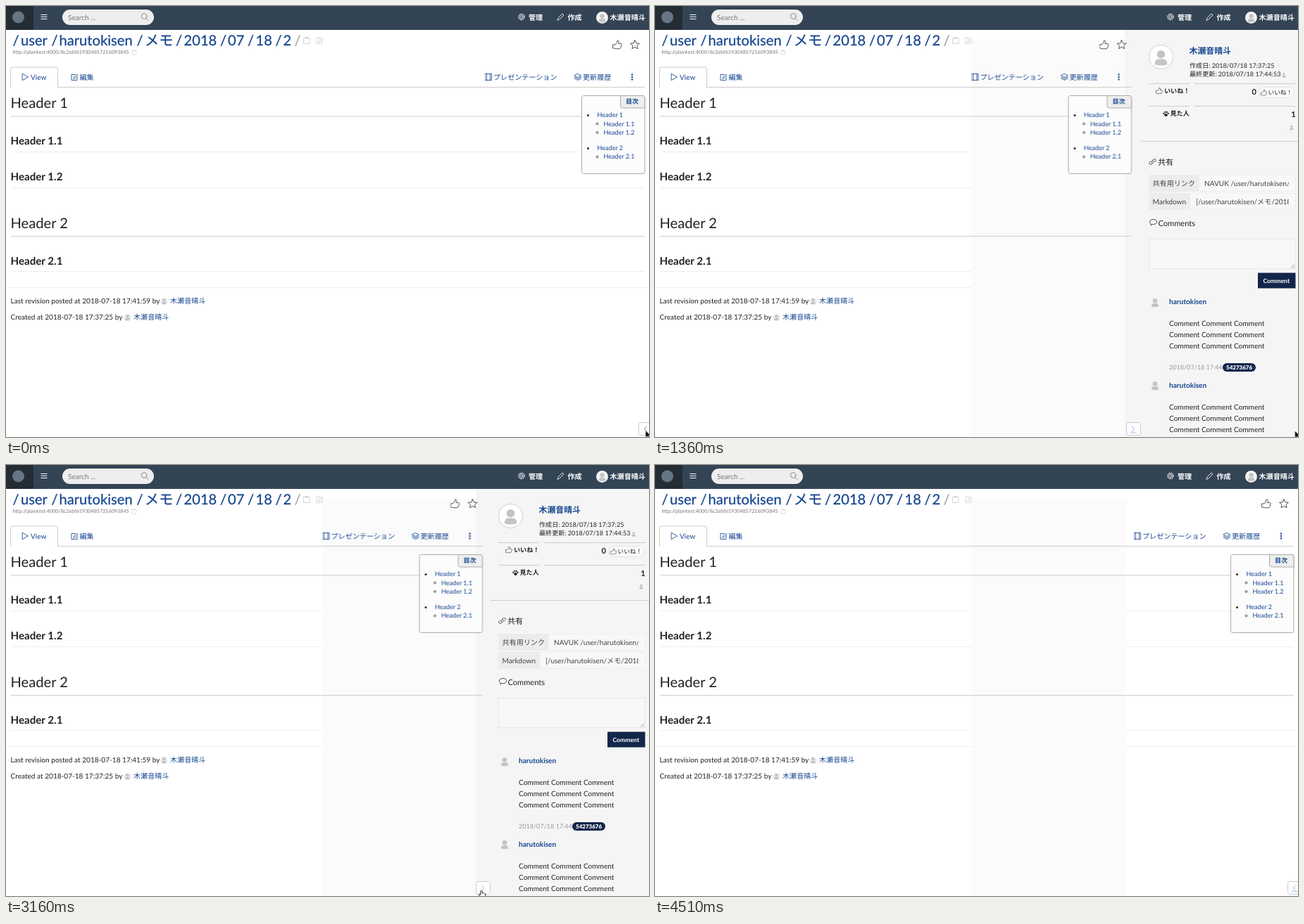
An HTML page that plays this animation: 913 px wide and 613 px high, repeating every 7.1 s.

```html
<!DOCTYPE html>
<html lang="ja">
<head>
<meta charset="utf-8">
<title>Wiki page with side panel</title>
<style>
html, body { margin: 0; width: 100%; height: 100%; overflow: hidden; background: #fff; }
svg { display: block; }
text { font: 10.08px Lato, "Noto Sans CJK JP", sans-serif; fill: #222; white-space: pre; text-rendering: geometricPrecision; }
.b { font-weight: 700; }
.link { fill: #15468f; }
.w { fill: #fff; }
.h1 { font-size: 20.16px; }
.h2 { font-size: 15.12px; font-weight: 700; }
.path { stroke: #15468f; stroke-width: .25; }
.sm { font-size: 9.07px; }
.xs { font-size: 8.64px; }
.md { font-size: 11.1px; }
.grey { fill: #999; }
.soft { fill: #444; }
.ico { fill: none; stroke: #333; stroke-width: .85; stroke-linejoin: round; stroke-linecap: round; }
.ico.nav { stroke: #fff; }
.ico.blue { stroke: #15468f; }
.ico.pale { stroke: #ccc; }
.face { fill: #c4c4c4; }

/* every state is held, so all tracks jump */
.anim { animation: 7100ms step-end infinite; }
.shift { animation-name: shift; }
.rule { animation-name: rule; transform-origin: 7px 0; }
.tint { animation-name: tint; transform-origin: 449px 0; }
.panel { animation-name: panel; }
.panel-bg { animation-name: panel-bg; }
.gap { animation-name: gap; }
.chevron { animation-name: chevron; }
.underline { animation-name: underline; }
.arrow { animation-name: arrow; }
.hand { animation-name: hand; }
.beam { animation-name: beam; }

@keyframes shift {
  0% { transform: none; }
  17.183% { transform: translateX(-230.5px); }
  57.183%, 100% { transform: none; }
}
@keyframes rule {
  0% { transform: none; }
  17.183% { transform: scaleX(.7444); }
  57.183%, 100% { transform: none; }
}
@keyframes tint {
  0% { transform: scaleX(0); }
  17.183% { transform: none; }
  59.295% { transform: scaleX(.53); }
  61.408%, 100% { transform: scaleX(.4763); }
}
@keyframes panel {
  0% { transform: translateX(231px); }
  17.183% { transform: translateX(58px); }
  19.154% { transform: translateX(2px); }
  21.267% { transform: none; }
  57.183% { transform: translateX(28px); }
  59.295% { transform: translateX(207px); }
  61.408%, 100% { transform: translateX(231px); }
}
@keyframes panel-bg {
  0% { opacity: 0; }
  19.154% { opacity: 1; }
  57.183%, 100% { opacity: 0; }
}
@keyframes gap {
  0% { opacity: 1; }
  57.183% { opacity: 0; }
  59.295%, 100% { opacity: 1; }
}
@keyframes chevron {
  0% { transform: none; stroke: #5b84b8; }
  4.084% { transform: none; stroke: #8db4e2; }
  17.183% { transform: scaleX(-1); stroke: #8db4e2; }
  33.943% { transform: scaleX(-1); stroke: #a9bdd6; }
  57.183%, 100% { transform: none; stroke: #8db4e2; }
}
@keyframes underline {
  0% { opacity: 0; }
  17.183% { opacity: 1; }
  33.943% { opacity: 0; }
  61.408%, 100% { opacity: 1; }
}
@keyframes arrow {
  0% { transform: translate(908px, 603.5px); }
  12.957% { transform: translate(-99px, 0); }
  19.154% { transform: translate(908.5px, 604px); }
  27.605% { transform: translate(-99px, 0); }
  31.83% { transform: translate(636.5px, 611px); }
  33.943% { transform: translate(-99px, 0); }
  61.408% { transform: translate(765.5px, 597.5px); }
  63.521%, 100% { transform: translate(-99px, 0); }
}
@keyframes hand {
  0% { transform: translate(-99px, 0); }
  12.957% { transform: translate(908px, 604.5px); }
  17.183% { transform: translate(-99px, 0); }
  33.943% { transform: translate(677px, 600px); }
  36.056% { transform: translate(677.5px, 601px); }
  40.281% { transform: translate(677px, 602px); }
  42.394% { transform: translate(676px, 604px); }
  44.507% { transform: translate(675px, 605.5px); }
  61.408%, 100% { transform: translate(-99px, 0); }
}
@keyframes beam {
  0% { transform: translate(-99px, 0); }
  17.183% { transform: translate(909px, 605px); }
  19.154%, 100% { transform: translate(-99px, 0); }
}
</style>
</head>
<body>
<svg width="100%" height="100%" viewBox="0 0 913 613">
<defs>
  <path id="thumb" d="M-6 0h3l2.5-3 .4-2.6c1.7-.6 2.6.6 2.4 2l-.6 2.2h3.2c1.2 0 1.5 1 1.2 2l-1.5 4.2c-.3.8-.7 1-1.5 1h-5.6l-2.3-.7H-6z"/>
  <path id="star" d="M0-6.3 1.9-2.1 6.4-1.7 3 1.3 4 5.8 0 3.4-4 5.8-3 1.3-6.4-1.7-1.9-2.1z"/>
  <path id="pencil" d="M-4.5 4.5l1-3 6-6 2 2-6 6z"/>
  <path id="edit" d="M1-3.5h-5v8h8V0M-1 2l.5-2 4-4 1.5 1.5-4 4z"/>
  <path id="clip" d="M-4-3.5h8v8h-8zM-1.5-4.5h3v1.5h-3z"/>
  <path id="play" d="M-3.5-4.5 4.5 0-3.5 4.5z"/>
  <path id="film" d="M-4.5-4.5h9v9h-9zM-2.5-4.5v9M2.5-4.5v9"/>
  <path id="layers" d="M0-4.5 4.7-2 0 .5-4.7-2zM-4.7 0 0 2.5 4.7 0M-4.7 2 0 4.5 4.7 2"/>
  <path id="chain" d="M-1 1.8a2 2 0 0 1 0-2.8L1.6-3.6a2 2 0 0 1 2.8 2.8L3 .6M1-1.8A2 2 0 0 1 1 1L-1.6 3.6A2 2 0 0 1-4.4.8L-3-.6"/>
  <path id="bubble" d="M-3 4.2l.3-1.8a5.2 3.6 0 1 1 2.2.7z"/>
  <g id="paw"><ellipse cy="1.7" rx="2.3" ry="2"/><circle cx="-3.2" cy="-.4" r="1.1"/><circle cx="-1.2" cy="-2.4" r="1.1"/><circle cx="1.2" cy="-2.4" r="1.1"/><circle cx="3.2" cy="-.4" r="1.1"/></g>
  <g id="person"><circle cy="-2.7" r="3.3"/><path d="M-5 5.5q0-4.4 3-4.4h4q3 0 3 4.4-5 1.6-10 0z"/></g>
  <g id="tiny"><circle r="5.2" fill="#ebebeb"/><use href="#person" class="face" transform="scale(.65)"/></g>
</defs>

<!-- faint rules, then the flat area that hides them -->
<g fill="#eee">
  <rect x="7" y="207" width="900" height="1"/>
  <rect x="7" y="258" width="900" height="1"/>
  <rect x="7" y="377" width="900" height="1"/>
  <rect y="400" width="913" height="1"/>
</g>
<rect class="anim tint" x="449" y="48" width="464" height="565" fill="#fbfbfb"/>
<rect class="anim panel-bg" x="667" y="34" width="246" height="579" fill="#f5f5f5"/>

<g class="anim panel">
  <circle cx="716.5" cy="72.5" r="17" fill="#fff" stroke="#ccc"/>
  <use href="#person" class="face" transform="translate(716.5 73.5) scale(1.75)"/>
  <text class="link b" x="756.5" y="67.5" style="font-size:11.9px">木瀬音晴斗</text>
  <text class="sm" x="757" y="88">作成日: 2018/07/18 17:37:25</text>
  <text class="sm" x="757" y="100.3">最終更新: 2018/07/18 17:44:53</text>
  <use href="#person" class="face" transform="translate(891 98.5) scale(.55)"/>
  <path d="M699 110.5h58m7 0h144M699 142.5h58m7 0h144M688 192.5h225" stroke="#ccc" fill="none"/>
  <use href="#thumb" class="ico" transform="translate(714 120.5) scale(.72)"/>
  <text class="sm b" x="721" y="124">いいね！</text>
  <text class="md b" x="845.5" y="126.2">0</text>
  <rect x="855.5" y="115.5" width="50" height="15" rx="7" fill="#fafafa" stroke="#e3e3e3"/>
  <use href="#thumb" class="ico" transform="translate(862.5 123) scale(.68)"/>
  <text class="xs" x="868.5" y="126.2">いいね！</text>
  <use href="#paw" x="723.5" y="153.3" fill="#222"/>
  <text class="sm b" x="729.5" y="156">見た人</text>
  <text class="md b" x="901.3" y="158">1</text>
  <use href="#person" class="face" transform="translate(902 173) scale(.55)"/>

  <use href="#chain" class="ico" x="704.5" y="221.5"/>
  <text class="md" x="712" y="225.5">共有</text>
  <g fill="#ececec">
    <rect x="699.5" y="240" width="71" height="24"/>
    <rect x="699.5" y="266" width="58.5" height="24"/>
  </g>
  <path d="M770.5 240.5h137v23h-137zM758 266.5h149.500v23H758z" fill="#f8f8f8" stroke="#efefef"/>
  <text class="soft" x="704.5" y="255.5">共有用リンク</text>
  <text class="soft" x="704.5" y="281.5">Markdown</text>
  <svg x="760" y="240" width="138" height="50">
    <text class="soft" x="18" y="15.5">NAVUK /user/harutokisen/メモ</text>
    <text class="soft" x="6" y="41.5">[/user/harutokisen/メモ/2018/07</text>
  </svg>

  <use href="#bubble" class="ico" x="705" y="307.5"/>
  <text class="md" x="712.5" y="312.5">Comments</text>
  <rect x="699.5" y="331.5" width="208" height="42" fill="#fff" fill-opacity=".2" stroke="#e8e8e8"/>
  <path d="M901 372.500l5-5m-2 5l2-2" stroke="#888" stroke-width=".8"/>
  <rect x="854" y="379.5" width="53.5" height="22" fill="#12264a"/>
  <text class="xs b w" x="861.5" y="393.5">Comment</text>

  <g class="anim gap">
    <use href="#person" class="face" x="708" y="422"/>
    <text class="link b" x="728" y="424">harutokisen</text>
    <text x="728" y="455">Comment Comment Comment</text>
  </g>
  <text x="728" y="471">Comment Comment Comment</text>
  <text x="728" y="487">Comment Comment Comment</text>
  <text class="sm grey" x="728" y="517">2018/07/18 17:44</text>
  <rect x="804" y="508" width="47" height="12" rx="6" fill="#12264a"/>
  <text class="w" x="809" y="517" style="font-size:8px;font-weight:900">54273676</text>
  <use href="#person" class="face" x="708" y="540"/>
  <text class="link b" x="728" y="542.5">harutokisen</text>
  <text x="728" y="573.5">Comment Comment Comment</text>
  <text x="728" y="589.5">Comment Comment Comment</text>
  <text x="728" y="605.5">Comment Comment Comment</text>

  <rect x="667.5" y="592.5" width="20" height="18" rx="3" fill="#fdfdfd" stroke="#ccc"/>
  <g transform="translate(677 601.5)" fill="none">
    <path class="anim chevron" d="M2.200-3.500-1.800 0 2.200 3.500" stroke="#8db4e2"/>
    <path class="anim underline" d="M-4.500 5h9" stroke="#8db4e2"/>
  </g>
</g>

<!-- page body -->
<g fill="#ccc">
  <rect class="anim rule" x="7" y="115" width="900" height="1"/>
  <rect class="anim rule" x="7" y="156.4" width="900" height="1"/>
  <rect class="anim rule" x="7" y="327" width="900" height="1"/>
</g>
<path d="M6.500 116.500V89.500q0-2.500 2.500-2.500h62q2.500 0 2.500 2.500v27z" fill="#fff"/>
<path d="M6.500 116V89.500q0-2.500 2.500-2.500h62q2.500 0 2.500 2.500V116" fill="none" stroke="#ccc"/>
<use href="#play" class="ico blue" x="27" y="101"/>
<text class="link" x="35" y="105">View</text>
<use href="#edit" class="ico blue" x="97" y="101"/>
<text class="link" x="104.5" y="105">編集</text>

<g class="path">
  <text class="h1 link" x="9.5" y="56">/</text>
  <text class="h1 link" x="21" y="56">user</text>
  <text class="h1 link" x="64.5" y="56">/</text>
  <text class="h1 link" x="75.5" y="56">harutokisen</text>
  <text class="h1 link" x="185.5" y="56">/</text>
  <text class="h1 link" x="197" y="56">メモ</text>
  <text class="h1 link" x="241" y="56">/</text>
  <text class="h1 link" x="252.5" y="56">2018</text>
  <text class="h1 link" x="304" y="56">/</text>
  <text class="h1 link" x="315" y="56">07</text>
  <text class="h1 link" x="343" y="56">/</text>
  <text class="h1 link" x="354.5" y="56">18</text>
  <text class="h1 link" x="382.5" y="56">/</text>
  <text class="h1 link" x="393.5" y="56">2</text>
</g>
<text class="h1 grey" x="409.5" y="56">/</text>
<use href="#clip" class="ico pale" x="427" y="49"/>
<use href="#edit" class="ico pale" x="445" y="49"/>
<text x="9.5" y="68" style="font-size:7.2px;fill:#777">http://plaintest:4000/8c2ebf619304857216093845</text>
<use href="#clip" class="ico pale" transform="translate(182 66) scale(.7)"/>

<text class="h1" x="6.5" y="145">Header 1</text>
<text class="h2" x="6.5" y="197">Header 1.1</text>
<text class="h2" x="6.5" y="247.5">Header 1.2</text>
<text class="h1" x="6.5" y="315.5">Header 2</text>
<text class="h2" x="6.5" y="367.5">Header 2.1</text>
<text x="6.5" y="423">Last revision posted at 2018-07-18 17:41:59 by</text>
<use href="#tiny" x="224.5" y="420"/>
<text class="link" x="233" y="423">木瀬音晴斗</text>
<text x="6.5" y="446">Created at 2018-07-18 17:37:25 by</text>
<use href="#tiny" x="172.5" y="443"/>
<text class="link" x="181" y="446">木瀬音晴斗</text>

<!-- parts pinned to the right edge of the page body -->
<g class="anim shift">
  <use href="#thumb" class="ico" x="868" y="55"/>
  <use href="#star" class="ico" x="893" y="55"/>
  <use href="#film" class="ico blue" x="685" y="101"/>
  <text class="link" x="692" y="105">プレゼンテーション</text>
  <use href="#layers" class="ico blue" x="812" y="101"/>
  <text class="link" x="819" y="105">更新履歴</text>
  <path d="M889 97.500h.01M889 101h.01M889 104.500h.01" stroke="#15468f" stroke-width="2.4" stroke-linecap="round"/>
  <rect x="817.5" y="127.5" width="89.5" height="111" rx="3" fill="#fcfcfc" stroke="#aaa"/>
  <path d="M872.500 127.500H904q3 0 3 3V145h-31.500q-3 0-3-3z" fill="#eee" stroke="#aaa"/>
  <text class="sm link b" x="880" y="139.3">目次</text>
  <g fill="#222"><circle cx="826.5" cy="155.5" r="1.5"/><circle cx="826.5" cy="202.5" r="1.5"/></g>
  <g fill="none" stroke="#222" stroke-width=".8"><circle cx="839.5" cy="167.5" r="1.4"/><circle cx="839.5" cy="180" r="1.4"/><circle cx="839.5" cy="214.5" r="1.4"/></g>
  <text class="sm link" x="839.5" y="158">Header 1</text>
  <text class="sm link" x="848.5" y="170.5">Header 1.1</text>
  <text class="sm link" x="848.5" y="183">Header 1.2</text>
  <text class="sm link" x="839.5" y="205">Header 2</text>
  <text class="sm link" x="848.5" y="217.3">Header 2.1</text>
</g>

<!-- top bar -->
<rect width="913" height="34" fill="#334455"/>
<rect width="39" height="34" fill="#242c34"/>
<circle cx="17.5" cy="16" r="8.5" fill="#667584"/>
<path d="M49.500 12.500h9m-9 3h9m-9 3h9" stroke="#fff" stroke-width="1.2"/>
<rect x="80" y="5" width="130" height="22" rx="11" fill="#eee"/>
<text x="88" y="19.5" style="fill:#777">Search ...</text>
<path class="ico" d="M199 17.500l3 3M200 14.500a3.800 3.800 0 1 1-7.600 0 3.800 3.800 0 0 1 7.600 0" style="stroke:#777"/>
<g class="ico nav" transform="translate(732 15.5)">
  <circle r="1.7"/><circle r="3.6"/>
  <circle r="4.6" stroke-dasharray="1.6 2.013" stroke-linecap="butt"/>
</g>
<text class="w b" x="742" y="19.5">管理</text>
<use href="#pencil" class="ico nav" x="787.5" y="15.5"/>
<text class="w b" x="797.5" y="19.5">作成</text>
<circle cx="846.5" cy="16.5" r="8.5" fill="#f3f3f3"/>
<use href="#person" class="face" transform="translate(846.5 17) scale(.95)"/>
<text class="w b" x="857.5" y="19.5">木瀬音晴斗</text>

<!-- pointers -->
<path class="anim arrow" d="M0 0v10.500l2.500-2.300 1.600 3.700 1.700-.7-1.600-3.600h3.300z" fill="#000" stroke="#fff" stroke-width=".7"/>
<path class="anim hand" d="M-1.200 6V.8Q-1.200-.5 0-.5T1.200.8V3.500q1-.5 1.700.3 1-.4 1.600.5 1.500-.3 1.500 1.200L5.500 8.500v2h-5L-3.500 6.500q-.5-1.300.6-1.400z" fill="#fff" stroke="#000" stroke-width=".9" stroke-linejoin="round"/>
<path class="anim beam" d="M-2-5.500q2 0 2 1.500 0-1.500 2-1.500M0-4V4M-2 5.500q2 0 2-1.500 0 1.500 2 1.500" fill="none" stroke="#222"/>
</svg>
</body>
</html>
```
